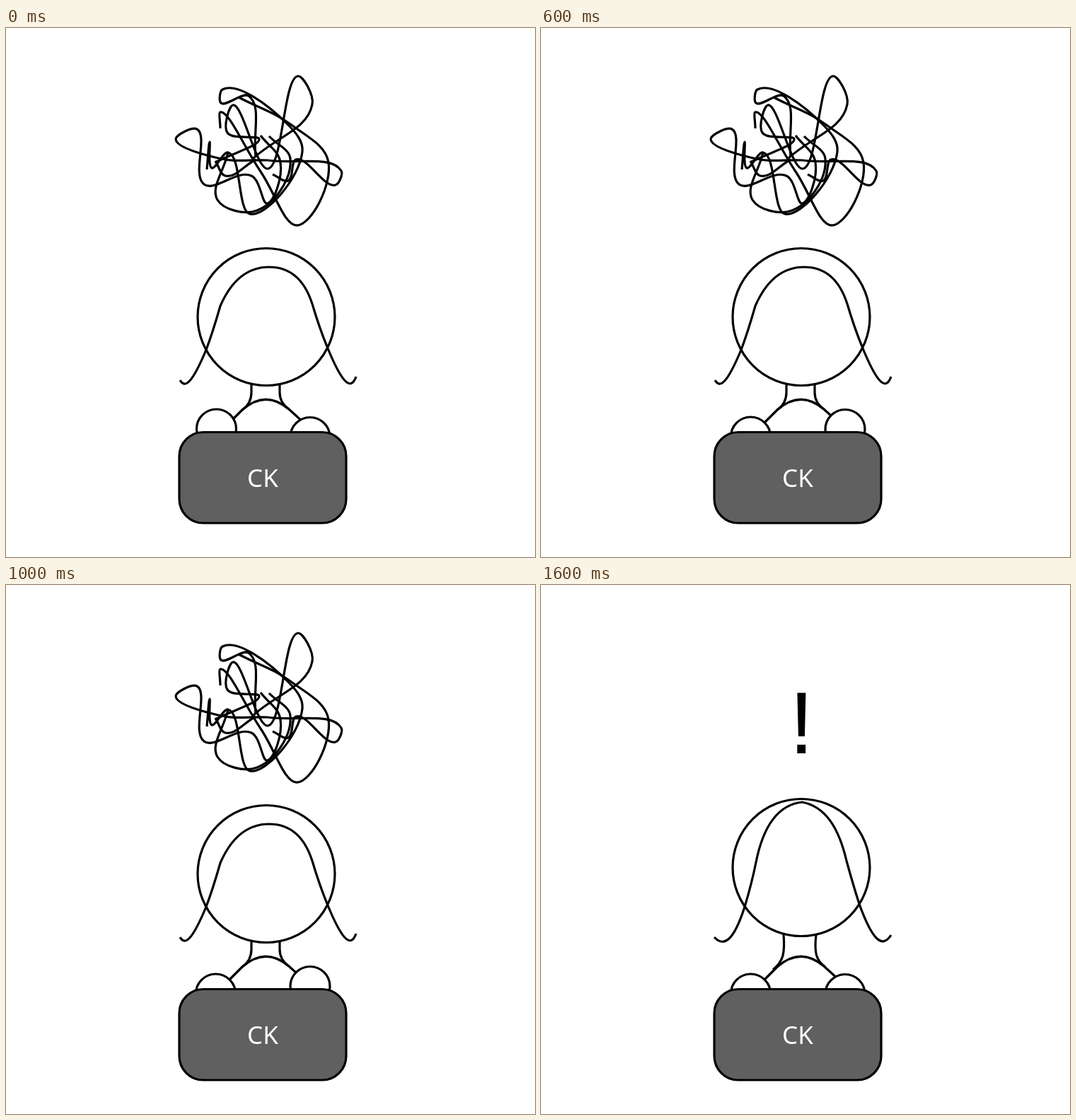
An HTML page with a canvas for the animation above (2.6 s loop, 748 by 748 pixels).

```html
<!DOCTYPE html>
<html lang="en">
<head>
<meta charset="utf-8">
<title>Thinking at the laptop</title>
<style>
  html, body { margin: 0; width: 100%; height: 100%; overflow: hidden; background: #fff; }
  canvas { display: block; width: 100vw; height: 100vh; }
</style>
</head>
<body>
<canvas id="stage" width="748" height="748"></canvas>
<script>
const ctx = document.getElementById('stage').getContext('2d');
const LOOP = 2600, STEP = 200, IDEA_AT = 1600;

const tangle = [
  [370,187, 300,184, 240,157, 270,143, 280,221, 347,209, 369,248, 388,190, 360,152],
  [284,200, 288,161, 291,198, 314,176, 345,263, 419,175, 400,138, 306,87, 304,106, 343,96, 353,182],
  [353,186, 310,209, 296,188],
  [314,176, 299,243, 355,258, 402,185, 372,153],
  [329,98, 405,138, 456,190, 412,279, 360,203, 303,119, 303,142],
  [350,184, 433,108, 413,68, 370,199, 321,109, 313,148, 358,157, 296,190],
  [370,187, 474,202, 466,222, 410,186, 399,216, 377,207]
];

// Smooth open curve: each tangent bisects its corner, and sharp corners stay tight.
function smooth(p) {
  const last = p.length / 2 - 1;
  const seg = i => {
    const k = 2 * Math.max(0, Math.min(last - 1, i));
    const dx = p[k + 2] - p[k], dy = p[k + 3] - p[k + 1], len = Math.hypot(dx, dy);
    return { x: dx / len, y: dy / len, len };
  };
  const tangent = i => {
    const a = seg(i - 1), b = seg(i);
    return { x: a.x + b.x, y: a.y + b.y };
  };
  ctx.beginPath();
  ctx.moveTo(p[0], p[1]);
  for (let i = 0; i < last; i++) {
    const [x, y, u, v] = p.slice(2 * i);
    const a = tangent(i), b = tangent(i + 1), h = seg(i).len / 5;
    ctx.bezierCurveTo(x + a.x * h, y + a.y * h, u - b.x * h, v - b.y * h, u, v);
  }
  ctx.stroke();
}

const line = d => ctx.stroke(new Path2D(d));

function disc(x, y, r) {
  ctx.beginPath();
  ctx.arc(x, y, r, 0, 2 * Math.PI);
  ctx.fillStyle = '#fff';
  ctx.fill();
  ctx.stroke();
}

function label(text, x, y, font, color) {
  ctx.font = font;
  ctx.fillStyle = color;
  ctx.fillText(text, x, y);
}

function thinkingHead() {
  tangle.forEach(smooth);
  disc(368, 408.5, 97);
  line('M246 498C253 510 263 503 283 455C291 434 297 414 303 393C320 354 344 338 372 338' +
       'C402 338 422 356 433 390Q443 424 455 453C474 499 487 515 495 493');
  line('M347 504V515Q347 531 334 540M387 504V515Q387 530 400 539');
}

function ideaHead() {
  label('!', 368.3, 237.5, '125px "Liberation Sans", Arial, sans-serif', '#000');
  disc(368, 399.5, 97);
  line('M245 498C259 513 273 502 288 455Q298 422 304 392C314 342 334 311 369 307' +
       'C402 313 421 343 432 390Q441 423 450 451C468 501 482 515 495 495');
  line('M343 494C345 520 343 532 328 544M389 494C386 520 389 531 402 540');
}

function body(leftUp, rightUp) {
  line('M314 560L334 540Q367 511 400 539L421 558');
  disc(leftUp ? 297.5 : 296.5, leftUp ? 567 : 578, 28);
  disc(430, rightUp ? 567.5 : 578.5, 28);

  ctx.beginPath();
  ctx.roundRect(245, 571.5, 236, 128.5, 34);
  ctx.fillStyle = '#606060';
  ctx.fill();
  ctx.stroke();
  label('CK', 363, 649, '35px "Noto Sans", "Open Sans", sans-serif', '#fff');
}

function draw(t) {
  const idea = t >= IDEA_AT;
  const leftTaps = Math.floor(t / STEP) % 2 === 0;
  ctx.fillStyle = '#fff';
  ctx.fillRect(0, 0, 748, 748);
  ctx.lineWidth = 3.2;
  ctx.strokeStyle = '#000';
  ctx.lineJoin = 'round';
  ctx.textAlign = 'center';
  if (idea) ideaHead(); else thinkingHead();
  body(!idea && leftTaps, !idea && !leftTaps);
}

const start = performance.now();
function tick() {
  draw((performance.now() - start) % LOOP);
  requestAnimationFrame(tick);
}
tick();
</script>
</body>
</html>
```
